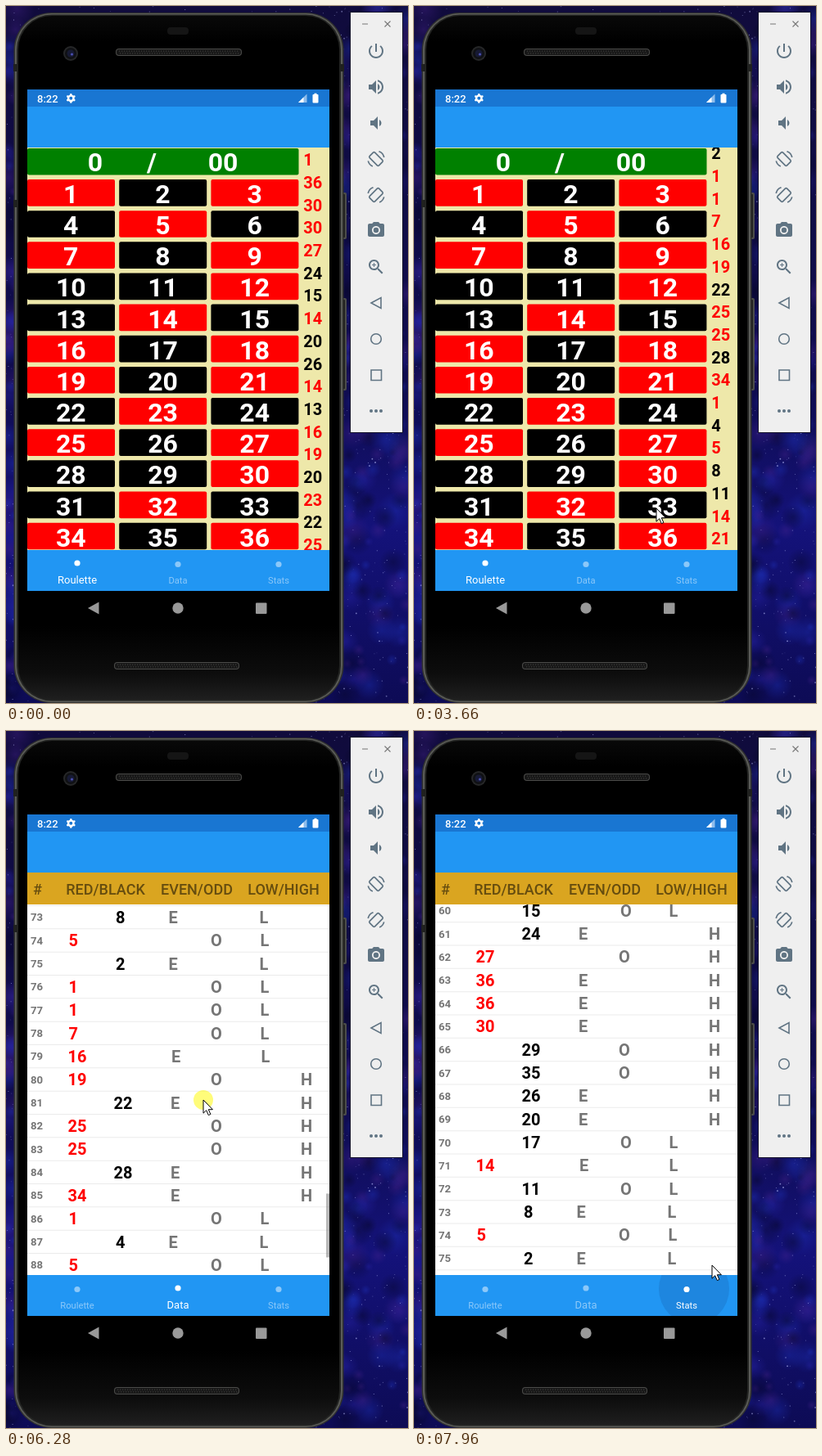
Animation of 491 by 852 pixels, one loop 7990 ms. Source, as an HTML page with a canvas:

```html
<!DOCTYPE html>
<html lang="en">
<head>
<meta charset="utf-8">
<title>Roulette tracker</title>
<style>
html, body { margin: 0; width: 100%; height: 100%; overflow: hidden; background: #0b0a38; }
canvas { display: block; }
</style>
</head>
<body>
<canvas id="stage" width="491" height="852"></canvas>
<script>
const W = 491, H = 852, LOOP = 7990;
const stage = document.getElementById('stage').getContext('2d');
const FONT = 'Roboto, sans-serif';
const BLUE = '#2196f3';
const REDS = new Set([1, 3, 5, 7, 9, 12, 14, 16, 18, 19, 21, 23, 25, 27, 30, 32, 34, 36]);

// Spins 1-18, a generated middle part, then spins 60-92.
const early = [1, 36, 30, 30, 27, 24, 15, 14, 20, 26, 14, 13, 16, 19, 20, 23, 22, 25];
const middle = Array.from({ length: 41 }, (_, i) => 1 + (i * i * 5 + i * 11 + 27) % 36);
const late = [15, 24, 27, 36, 36, 30, 29, 35, 26, 20, 17, 14, 11, 8, 5, 2, 1, 1, 7, 16, 19,
  22, 25, 25, 28, 34, 1, 4, 5, 8, 11, 14, 21];
const spins = [...early, ...middle, ...late];
const oldSpins = 85;

// Board taps: [time, number]
const taps = [[1000, 1], [1640, 4], [2000, 5], [2330, 8], [2630, 11], [2930, 14], [3270, 21]];
// Pointer: [time, x, y]
const route = [
  [30, 350, 406], [250, 76, 402], [400, 30, 288], [560, 15, 101], [880, 92, 226], [1020, 96, 230],
  [1370, 123, 277], [1660, 120, 270], [1980, 184, 271], [2040, 186, 272], [2310, 191, 309],
  [2360, 191, 310], [2620, 193, 347], [2660, 193, 348], [2910, 200, 384], [2960, 202, 385],
  [3250, 292, 459], [3330, 294, 462], [3660, 296, 614], [4040, 208, 697], [4200, 209, 696],
  [4900, 206, 645], [5340, 228, 572], [5700, 236, 469], [5740, 236, 462], [5990, 240, 577],
  [6250, 241, 451], [6290, 241, 451], [6560, 250, 632], [7030, 263, 460], [7080, 263, 462],
  [7300, 266, 511], [7340, 268, 512], [7720, 342, 712], [7800, 342, 708], [7960, 364, 653]];
// Times with the mouse button held
const holds = [...taps.map(([t]) => [t - 50, t + 60]), [4050, 4140],
  [5300, 5690], [5735, 6000], [6255, 6570], [7045, 7310], [7750, 7840]];
// Extra pull of the data list: [time, offset]
const pulls = [[5740, 0], [5990, 115.5], [6290, 115.5], [6560, 296], [6900, 427.2], [7080, 427.2], [7300, 475.6]];
const DATA_TAP = 4140, DATA_PAGE = 4200, STATS_TAP = 7940;

const clamp = v => Math.max(0, Math.min(1, v));
const smooth = u => u * u * (3 - 2 * u);
const easeOut = u => 1 - (1 - u) ** 2;

function track(keys, t) {
  if (t <= keys[0][0]) return keys[0].slice(1);
  for (let i = 1; i < keys.length; i++) {
    const a = keys[i - 1], b = keys[i];
    if (t <= b[0]) {
      const u = smooth((t - a[0]) / (b[0] - a[0]));
      return a.slice(1).map((v, k) => v + (b[k + 1] - v) * u);
    }
  }
  return keys[keys.length - 1].slice(1);
}

function seeded(seed) {
  return () => (seed = (seed * 16807) % 2147483647) / 2147483647;
}

function box(c, x, y, w, h, color, r = 0) {
  c.fillStyle = color;
  c.beginPath();
  c.roundRect(x, y, w, h, r);
  c.fill();
}

function disc(c, x, y, r, color) {
  c.fillStyle = color;
  c.beginPath();
  c.arc(x, y, r, 0, 7);
  c.fill();
}

function label(c, str, x, y, size, color, align = 'left', weight = 700) {
  c.font = `${weight} ${size}px ${FONT}`;
  c.textAlign = align;
  c.fillStyle = color;
  c.fillText(str, x, y);
}

function poly(c, points, color) {
  c.fillStyle = color;
  c.beginPath();
  points.forEach(([x, y]) => c.lineTo(x, y));
  c.closePath();
  c.fill();
}

function clipTo(c, x, y, w, h, paint) {
  c.save();
  c.beginPath();
  c.rect(x, y, w, h);
  c.clip();
  paint();
  c.restore();
}

function layer(paint) {
  const el = document.createElement('canvas');
  el.width = W;
  el.height = H;
  paint(el.getContext('2d'));
  return el;
}

function paintSky(c) {
  const g = c.createLinearGradient(0, 0, 0, H);
  g.addColorStop(0, '#100b3c');
  g.addColorStop(0.55, '#0f0c50');
  g.addColorStop(0.75, '#14127a');
  g.addColorStop(1, '#0d0b55');
  c.fillStyle = g;
  c.fillRect(0, 0, W, H);
  const rnd = seeded(4711);
  for (let i = 0; i < 260; i++) {
    const x = rnd() < 0.25 ? rnd() * 14 : 400 + rnd() * 91, y = rnd() * H, r = 5 + rnd() * 18;
    const tint = ['40,36,170', '70,34,140', '4,4,30', '30,50,190'][Math.floor(rnd() * 4)];
    const spot = c.createRadialGradient(x, y, 0, x, y, r);
    spot.addColorStop(0, `rgba(${tint},.38)`);
    spot.addColorStop(1, `rgba(${tint},0)`);
    c.fillStyle = spot;
    c.fillRect(x - r, y - r, 2 * r, 2 * r);
  }
  for (let i = 0; i < 1900; i++) {
    const size = rnd() < 0.06 ? 0.9 : 0.5;
    disc(c, rnd() * W, rnd() * H, size, `rgba(190,195,255,${0.15 + rnd() * 0.65})`);
  }
}

function speaker(c, x, y, w) {
  box(c, x, y, w, 9, '#4b4b49', 4);
  box(c, x + 1, y + 1, w - 2, 7, '#171717', 3);
  for (let i = 4; i < w - 4; i += 3) {
    box(c, x + i, y + 2.5, 1.3, 1.3, '#3d3d3b');
    box(c, x + i + 1, y + 5.2, 1.3, 1.3, '#3d3d3b');
  }
}

function paintPhone(c) {
  [[228, 57], [357, 113]].forEach(([y, h]) => {
    box(c, 410, y, 6, h, '#4c4d4a', 2);
    box(c, 411, y + 2, 3, h - 4, '#20211f', 1);
  });
  box(c, 9.5, 8, 403, 844, '#30312f', 46);
  box(c, 11, 9, 400, 842, '#5b5c58', 45);
  box(c, 13, 10.5, 396, 839, '#242523', 43);
  const g = c.createLinearGradient(0, 10, 0, 850);
  g.addColorStop(0, '#090909');
  g.addColorStop(0.04, '#000');
  g.addColorStop(0.89, '#000');
  g.addColorStop(0.96, '#0d0d0d');
  g.addColorStop(1, '#202020');
  box(c, 15, 12, 392, 836, g, 41);
  [71, 237].forEach(y => box(c, 9, y, 5, 9, '#20211f'));
  box(c, 408, 71, 5, 9, '#20211f');
  box(c, 197, 26, 26, 9, '#151515', 4);
  disc(c, 79, 58, 9, '#262728');
  disc(c, 79, 58, 7, '#101114');
  disc(c, 79, 58, 4.5, '#171a34');
  disc(c, 80.5, 59, 1.6, '#4a4fb0');
  speaker(c, 134, 52, 154);
  speaker(c, 132, 802, 153);

  box(c, 26, 102, 369, 21, '#1976d2');
  box(c, 26, 123, 369, 50, BLUE);
  label(c, '8:22', 38, 117.5, 13, '#fff', 'left', 500);
  c.strokeStyle = '#fff';
  c.lineWidth = 2.4;
  c.beginPath();
  c.arc(79.3, 112.8, 3.2, 0, 7);
  c.stroke();
  for (let i = 0; i < 6; i++) {
    const a = i * Math.PI / 3 + Math.PI / 6;
    disc(c, 79.3 + 4.6 * Math.cos(a), 112.8 + 4.6 * Math.sin(a), 1.3, '#fff');
  }
  poly(c, [[357, 118], [367.5, 118], [367.5, 107.5]], '#8fbdec');
  poly(c, [[357, 118], [363.5, 118], [363.5, 111.5]], '#fff');
  box(c, 374.5, 108, 7, 10.5, '#fff', 1);
  box(c, 376.5, 106.7, 3, 2, '#fff');

  poly(c, [[100, 736], [113.5, 728.5], [113.5, 743.5]], '#999');
  disc(c, 210, 736, 6.7, '#999');
  box(c, 305, 729.5, 13.5, 13.5, '#999', 1);
}

const icons = {
  55: 'M13 3h-2v10h2V3zm4.83 2.17l-1.42 1.42C17.99 7.86 19 9.81 19 12c0 3.87-3.13 7-7 7s-7-3.13-7-7c0-2.19 1.01-4.14 2.58-5.42L6.17 5.17C4.23 6.82 3 9.26 3 12c0 4.97 4.03 9 9 9s9-4.03 9-9c0-2.74-1.23-5.18-3.17-6.83z',
  99: 'M3 9v6h4l5 5V4L7 9H3zm13.5 3c0-1.77-1.02-3.29-2.5-4.03v8.05c1.48-.73 2.5-2.25 2.5-4.02zM14 3.23v2.06c2.89.86 5 3.54 5 6.71s-2.11 5.85-5 6.71v2.06c4.01-.91 7-4.49 7-8.77s-2.99-7.86-7-8.77z',
  143: 'M18.5 12c0-1.77-1.02-3.29-2.5-4.03v8.05c1.48-.73 2.5-2.25 2.5-4.02zM5 9v6h4l5 5V4L9 9H5z',
  274: 'M9 2L7.17 4H4c-1.1 0-2 .9-2 2v12c0 1.1.9 2 2 2h16c1.1 0 2-.9 2-2V6c0-1.1-.9-2-2-2h-3.17L15 2H9zm3 15c-2.76 0-5-2.24-5-5s2.24-5 5-5 5 2.24 5 5-2.24 5-5 5zm-3.2-5a3.2 3.2 0 1 0 6.4 0a3.2 3.2 0 1 0-6.4 0z',
  319: 'M15.5 14h-.79l-.28-.27C15.41 12.59 16 11.11 16 9.5 16 5.91 13.09 3 9.5 3S3 5.91 3 9.5 5.91 16 9.5 16c1.61 0 3.09-.59 4.23-1.57l.27.28v.79l5 4.99L20.49 19l-4.99-5zm-6 0C7.01 14 5 11.99 5 9.5S7.01 5 9.5 5 14 7.01 14 9.5 11.99 14 9.5 14zm2.5-4h-2v2H9v-2H7V9h2V7h1v2h2v1z'
};

function rotateIcon(c, y, flip) {
  c.save();
  c.translate(452, y);
  c.scale(flip, 1);
  c.lineWidth = 1.7;
  c.beginPath();
  c.arc(0, 0, 10, 2.0, 2.9);
  c.moveTo(3.5, -9.4);
  c.arc(0, 0, 10, -1.2, -0.2);
  c.stroke();
  c.rotate(Math.PI / 4);
  c.beginPath();
  c.roundRect(-8, -4.5, 16, 9, 1.5);
  c.stroke();
  c.restore();
}

function paintPanel(c) {
  const ink = '#607483';
  box(c, 420, 7, 65, 515, '#16152c');
  box(c, 421, 8, 63, 513, '#efefef');
  c.strokeStyle = '#777';
  c.lineWidth = 1.1;
  c.stroke(new Path2D('M435 22h7M462.5 18.5l7 7M469.5 18.5l-7 7'));
  for (const y in icons) {
    c.save();
    c.translate(440, y - 12);
    c.fillStyle = ink;
    c.fill(new Path2D(icons[y]), 'evenodd');
    c.restore();
  }
  c.strokeStyle = ink;
  rotateIcon(c, 187, 1);
  rotateIcon(c, 231, -1);
  c.lineWidth = 1.6;
  c.stroke(new Path2D('M446 363l12-6.5v13zM446 445h12.5v12.5h-12.5z'));
  c.beginPath();
  c.arc(452, 407, 6.3, 0, 7);
  c.stroke();
  [446, 452, 458].forEach(x => disc(c, x, 495, 2, ink));
}

const backdrop = layer(c => {
  paintSky(c);
  paintPhone(c);
  paintPanel(c);
});

const cell = n => [26 + (n - 1) % 3 * 112.2, 212 + Math.floor((n - 1) / 3) * 38.15];

const board = layer(c => {
  box(c, 26, 173, 369, 492, '#eee8aa');
  box(c, 26, 174, 331.5, 32.5, '#008000', 2);
  [['0', 109], ['/', 178], ['00', 265]].forEach(([s, x]) => label(c, s, x, 202, 32, '#fff', 'center'));
  for (let n = 1; n <= 36; n++) {
    const [x, y] = cell(n);
    box(c, x, y, 107, 32.7, REDS.has(n) ? '#f00' : '#000', 2);
    label(c, n, x + 53.3, y + 29, 32, '#fff', 'center');
  }
});

function historyScroll(t) {
  const first = 1891.5 * easeOut(clamp((t - 1050) / 357));
  return taps.slice(1).reduce((s, [at]) => s + 27.7 * easeOut(clamp((t - at - 50) / 220)), first);
}

function drawBoard(c, t) {
  c.drawImage(board, 0, 0);
  for (const [at, n] of taps) {
    const u = (t - at) / 260;
    if (u < 0 || u > 1) continue;
    const [x, y] = cell(n);
    box(c, x, y, 107, 32.7, `rgba(255,255,255,${0.22 * (1 - u)})`, 2);
  }
  const count = oldSpins + taps.filter(([at]) => t >= at + 50).length;
  const top = 188 - historyScroll(t);
  clipTo(c, 358, 173, 37, 492, () => {
    for (let i = 0; i < count; i++) {
      const y = top + i * 27.7;
      if (y > 155 && y < 685) label(c, spins[i], 363.3, y + 7.2, 20, REDS.has(spins[i]) ? '#f00' : '#000');
    }
  });
}

function drawDataRow(c, i, y) {
  const n = spins[i - 1], red = REDS.has(n), small = n < 10, teen = !small && n < 19;
  const grey = '#757575', base = y + 7.2;
  box(c, 26, y + 13.6, 369, 1, '#ebebeb');
  label(c, i, 30, y + 4.7, 13.2, grey);
  if (red) label(c, n, small ? 76.6 : 75.6, base, 20, '#f00');
  else label(c, n, small ? 134 : 131.6, base, 20, '#000');
  if (n % 2) label(c, 'O', teen ? 259 : 257, base, 20, grey, 'center');
  else label(c, 'E', small ? 204 : teen ? 207.5 : 206.5, base, 20, grey, 'center');
  if (n < 19) label(c, 'L', small ? (n % 2 ? 316 : 315) : 317, base, 20, grey, 'center');
  else label(c, 'H', 367, base, 20, grey, 'center');
}

function drawData(c, t) {
  const [pull] = track(pulls, t);
  box(c, 26, 173, 369, 492, '#fff');
  clipTo(c, 26, 212, 369, 453, () => {
    for (let i = 1; i <= spins.length; i++) {
      const y = 650.6 - (spins.length - i) * 28.333 + pull;
      if (y > 190 && y < 685) drawDataRow(c, i, y);
    }
    const shown = clamp((t - 5290) / 50) * clamp((7700 - t) / 250);
    if (shown) box(c, 391, 585.5 - pull * 0.1735, 4, 78, `rgba(130,130,130,${0.55 * shown})`);
  });
  box(c, 26, 173, 369, 39, '#daa520');
  const ink = '#664d0f';
  [['#', 38.5], ['RED/BLACK', 121.5], ['EVEN/ODD', 233], ['LOW/HIGH', 339]]
    .forEach(([s, x]) => label(c, s, x, 200, 18, ink, 'center', 500));
}

function drawTabs(c, t) {
  box(c, 26, 665, 369, 50, BLUE);
  const ripples = [[DATA_TAP - 40, 210], [STATS_TAP - 100, 342]];
  clipTo(c, 26, 665, 369, 50, () => ripples.forEach(([at, x]) => {
    const u = (t - at) / 120;
    if (u > 0 && u < 4) disc(c, x, 682, 43 * easeOut(clamp(u)), `rgba(20,80,150,${0.22 * clamp(4 - u)})`);
  }));
  const active = t < DATA_TAP ? 0 : t < STATS_TAP ? 1 : 2;
  const toData = clamp((t - DATA_TAP - 20) / 150), toStats = clamp((t - STATS_TAP - 20) / 150);
  const grow = [1 - toData, toData * (1 - toStats), toStats];
  ['Roulette', 'Data', 'Stats'].forEach((name, i) => {
    const x = 87 + i * 123, color = i === active ? '#fff' : '#8cc8f9';
    disc(c, x, 682.5 - 1.5 * grow[i], 3.6, color);
    label(c, name, x, 706, 11.2 + 1.8 * grow[i], color, 'center', 400);
  });
}

const arrow = new Path2D('M0 0V16.2L3.7 12.7L6.3 18.6L8.9 17.5L6.3 11.7H11.4Z');

function drawPointer(c, t) {
  if (t < 30) return;
  const [x, y] = track(route, t);
  if (holds.some(([a, b]) => t >= a && t <= b)) disc(c, x, y, 12, 'rgba(255,250,0,.52)');
  c.save();
  c.translate(x, y);
  c.fillStyle = '#fff';
  c.fill(arrow);
  c.strokeStyle = '#000';
  c.lineWidth = 1;
  c.stroke(arrow);
  c.restore();
}

function draw(now) {
  const t = now % LOOP;
  stage.drawImage(backdrop, 0, 0);
  if (t < DATA_PAGE + 150) drawBoard(stage, t);
  if (t >= DATA_PAGE) {
    stage.globalAlpha = clamp((t - DATA_PAGE) / 150);
    drawData(stage, t);
    stage.globalAlpha = 1;
  }
  drawTabs(stage, t);
  drawPointer(stage, t);
}

const start = performance.now();
function tick() {
  draw(performance.now() - start);
  requestAnimationFrame(tick);
}
tick();
</script>
</body>
</html>
```
